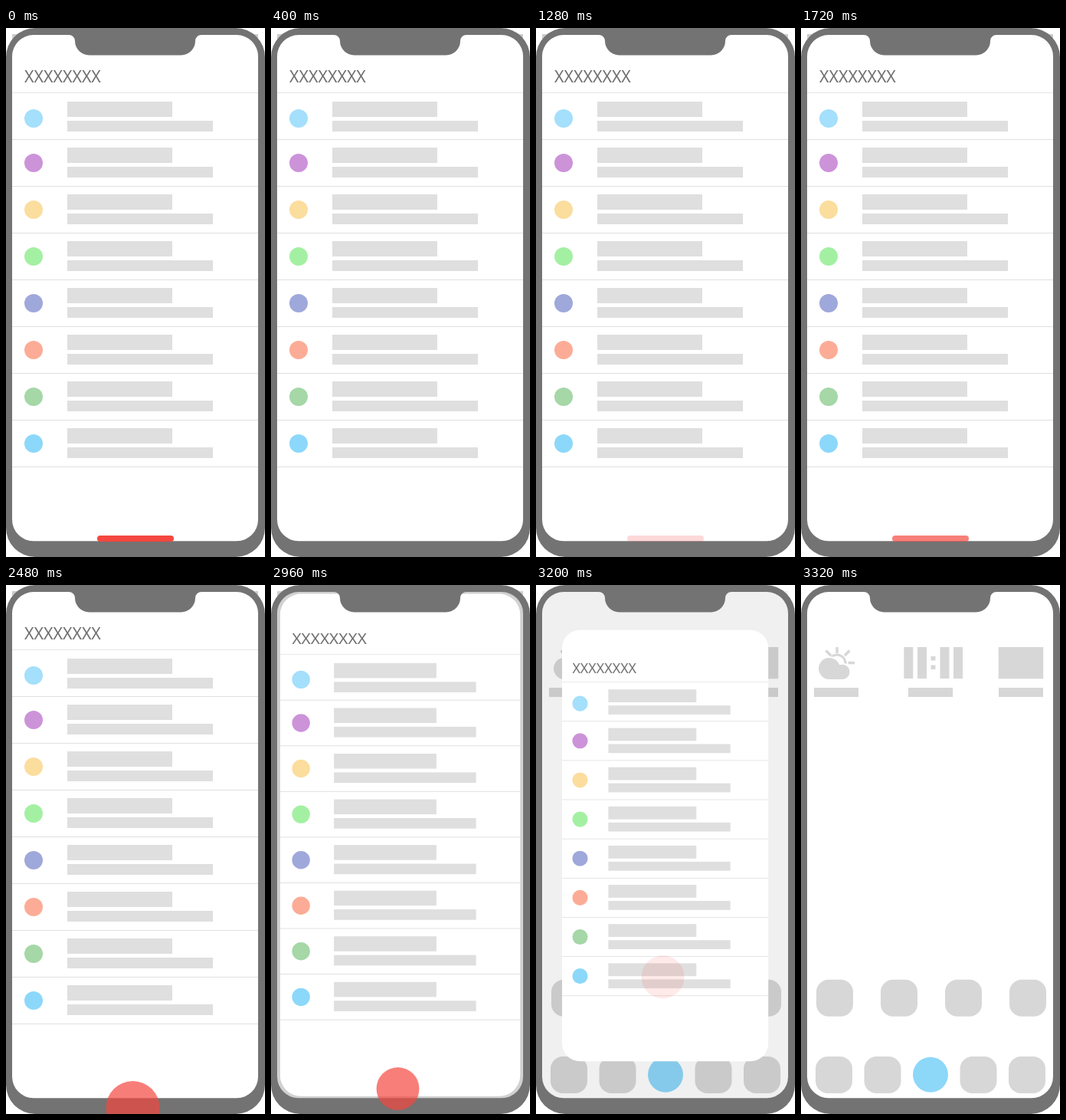
An HTML page that plays this animation: 338 by 690 pixels, repeating every 3960 ms.

```html
<!DOCTYPE html>
<html lang="en">
<head>
<meta charset="utf-8">
<title>Swipe up to go home</title>
<style>
  html, body { margin: 0; width: 100%; height: 100%; overflow: hidden; background: #fff; }
  svg { display: block; width: 338px; height: 690px; }

  .home { fill: #d7d7d7; }
  .title { font: 21.3px "Noto Sans", "Open Sans", sans-serif; fill: #707070; }
  .line { fill: #e0e0e0; }
  .block { fill: #dfdfdf; }
  .red { fill: #f4473f; }

  .shade, .app, .hint, .touch { animation: 3960ms linear infinite; }
  .shade { animation-name: shade; }
  .app { animation-name: shrink; transform-origin: 169px 345px; }
  .hint { animation-name: pulse; }
  .touch { animation-name: press, fade; transform-origin: 165.5px 682px; }

  /* the swipe runs from 2920 to 3320 ms */
  @keyframes shade {
    0%, 73.7374% { opacity: .2; }
    83.83%, 100% { opacity: 0; }
  }
  @keyframes shrink {
    0%, 73.7374% { transform: scale(1); visibility: visible; }
    83.82% { transform: scale(.7705); visibility: visible; }
    83.83%, 100% { transform: scale(.7705); visibility: hidden; }
  }
  @keyframes pulse {
    0%, 20.202%, 40.404% { opacity: 1; }
    10.101%, 30.303%, 50.5051%, 100% { opacity: 0; }
  }
  @keyframes press {
    0%, 64.6465% { transform: none; }
    71.7172%, 73.7374% { transform: translateY(0) scale(.8); }
    83.8384%, 100% { transform: translateY(-243px) scale(.8); }
  }
  @keyframes fade {
    0%, 56.5657% { opacity: 0; }
    62.6263%, 75.7576% { opacity: .7; }
    81.8182%, 100% { opacity: 0; }
  }
</style>
</head>
<body>
<svg viewBox="0 0 338 690">
  <g class="home" id="home">
    <!-- weather -->
    <circle cx="47" cy="102" r="11" fill="none" stroke="#d7d7d7" stroke-width="3"/>
    <path d="M47 81V89M32.5 85.5L39 92M63.5 85.5L57 92M61.5 101.5H70" stroke="#d7d7d7" stroke-width="3.5"/>
    <path d="M37 123A14 14 0 1 1 50.2 104.3A9.7 9.7 0 1 1 53 123Z" stroke="#fff" stroke-width="4" paint-order="stroke"/>
    <!-- clock -->
    <path d="M134.3 81h12v41h-12zM152 81h12v41h-12zM181.5 81h12v41h-12zM199 81h12v41h-12zM169.5 93h6v5.5h-6zM169.5 104.5h6v5.5h-6z"/>
    <rect x="257.7" y="81" width="58.5" height="41.3"/>
    <path d="M17 134h58v12h-58zM140 134h58v12h-58zM258 134h58v12h-58z"/>
    <circle cx="169" cy="638.7" r="23" fill="#8dd7f9"/>
  </g>
  <rect class="shade" x="8" y="8" width="321" height="662"/>

  <g class="app" id="app">
    <rect x="8" y="3.5" width="321" height="671" rx="28" fill="#fff"/>
    <text class="title" x="24" y="70.5">XXXXXXXX</text>
    <rect x="8" y="84" width="321" height="1" fill="#e6e6e6"/>
  </g>

  <path fill="#737373" fill-rule="evenodd" d="
    M38 0H300A38 38 0 0 1 338 38V652A38 38 0 0 1 300 690H38A38 38 0 0 1 0 652V38A38 38 0 0 1 38 0Z
    M36 9H82A8 8 0 0 1 90 17A18.5 18.5 0 0 0 108.5 35.5H228.5A18.5 18.5 0 0 0 247 17A8 8 0 0 1 255 9
    H301A28 28 0 0 1 329 37V641.3A28 28 0 0 1 301 669.3H36A28 28 0 0 1 8 641.3V37A28 28 0 0 1 36 9Z"/>
  <rect class="hint red" x="119" y="662" width="100" height="8" rx="4"/>
  <circle class="touch red" cx="165.5" cy="682" r="35"/>
</svg>
<script>
  const add = (parent, tag, attrs) => {
    const el = document.createElementNS("http://www.w3.org/2000/svg", tag);
    for (const name in attrs) el.setAttribute(name, attrs[name]);
    parent.append(el);
  };
  const home = document.getElementById("home");
  const app = document.getElementById("app");

  const icon = (x, y) => add(home, "rect", { x, y, width: 48, height: 48, rx: 16 });
  [20, 104, 188, 272].forEach(x => icon(x, 514.8));
  [19, 82.5, 207.5, 271].forEach(x => icon(x, 615));

  const colors = ["#a4dffb", "#cc93d9", "#fbdd9e", "#a4f0a3", "#9fa8da", "#fcac96", "#a5d7a7", "#8cd8fa"];
  colors.forEach((fill, i) => {
    const y = 84 + 61 * i;
    const top = y + (i ? 11 : 12);
    add(app, "circle", { cx: 36, cy: y + (i ? 31 : 34), r: 12, fill });
    add(app, "rect", { class: "block", x: 80, y: top, width: 137, height: 20 });
    add(app, "rect", { class: "block", x: 80, y: top + 25, width: 190, height: 14 });
    add(app, "rect", { class: "line", x: 8, y: y + 61, width: 321, height: 1 });
  });
</script>
</body>
</html>
```
